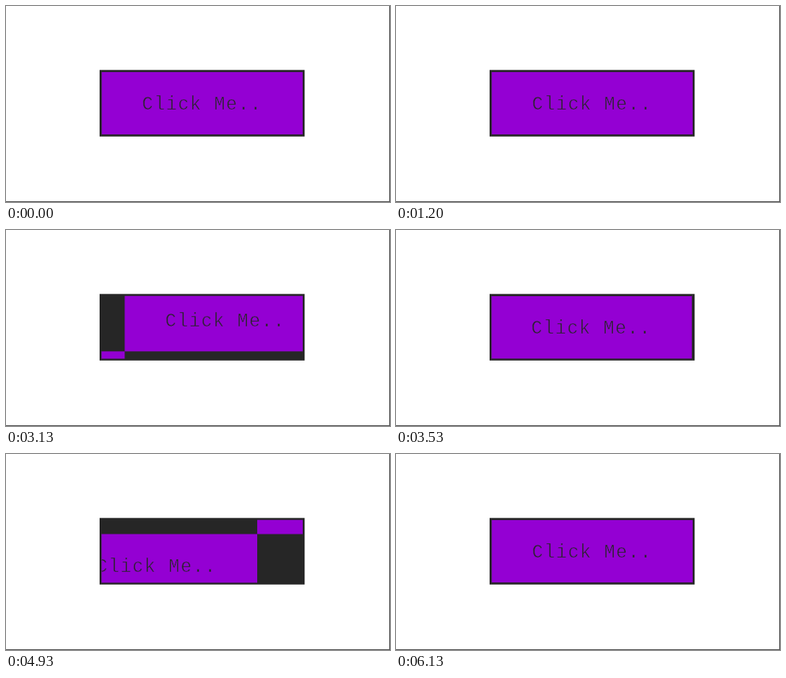
An HTML page that plays this animation: 480x246 px, repeating every 6.67 s.

```html
<!DOCTYPE html>
<html lang="en">
<head>
<meta charset="utf-8">
<title>Sliding button</title>
<style>
  html, body { margin: 0; width: 100%; height: 100%; overflow: hidden; background: #fff; }
  svg.stage { display: block; width: 480px; height: 246px; }
  .dark { fill: #262626; }
  .face { fill: #9400d3; }
  .edge { fill: #555; }
  text {
    font: 23px "Courier New", "Liberation Mono", monospace;
    letter-spacing: 1.2px;
    fill: #262626;
    stroke: #9400d3;
    stroke-width: .6px;
    white-space: pre;
  }
</style>
</head>
<body>
<svg class="stage" viewBox="0 0 480 246">
  <rect class="edge" x="479" width="1" height="246"/>
  <rect class="edge" y="245" width="480" height="1"/>
  <rect class="dark" x="117" y="80.3" width="256.3" height="83.5"/>
  <svg x="119.4" y="82.7" width="251.5" height="78.7" overflow="hidden">
    <g id="front">
      <rect class="face" width="251.5" height="78.7"/>
      <text x="50.6" y="47.1">Click Me..</text>
    </g>
    <g id="back">
      <rect class="face" width="251.5" height="78.7"/>
      <text x="50.6" y="47.1">Click Me..</text>
    </g>
  </svg>
</svg>
<script>
  const LOOP = 6670, TICK = 1000 / 15, SLIDE = 500;
  const W = 251.5, H = 78.7;

  // Hover starts and ends in turn: [start ms, slide position reached]
  const moves = [[690, 1], [1845, 0], [3077, 1], [3980, 0], [4697, 1], [5490, 0]];

  const front = document.getElementById("front");
  const back = document.getElementById("back");

  // CSS "ease": cubic-bezier(.25, .1, .25, 1)
  function ease(x) {
    if (x <= 0) return 0;
    if (x >= 1) return 1;
    let lo = 0, hi = 1;
    for (let i = 0; i < 30; i++) {
      const s = (lo + hi) / 2;
      if (0.75 * s * (1 - s) + s ** 3 < x) lo = s; else hi = s;
    }
    const s = lo, r = 1 - s;
    return 0.3 * r * r * s + 3 * r * s * s + s ** 3;
  }

  function slideAt(t) {
    let pos = 0;
    for (const [start, to] of moves) {
      if (t >= start) pos = 1 - to + (2 * to - 1) * ease((t - start) / SLIDE);
    }
    return pos;
  }

  function place(el, p) {
    el.setAttribute("transform", `translate(${(W * p).toFixed(2)} ${(-H * p).toFixed(2)})`);
  }

  function draw() {
    const t = performance.now() % LOOP;
    const p = slideAt(Math.floor((t + 4) / TICK) * TICK);
    place(front, p);
    place(back, p - 1);
    requestAnimationFrame(draw);
  }
  draw();
</script>
</body>
</html>
```
